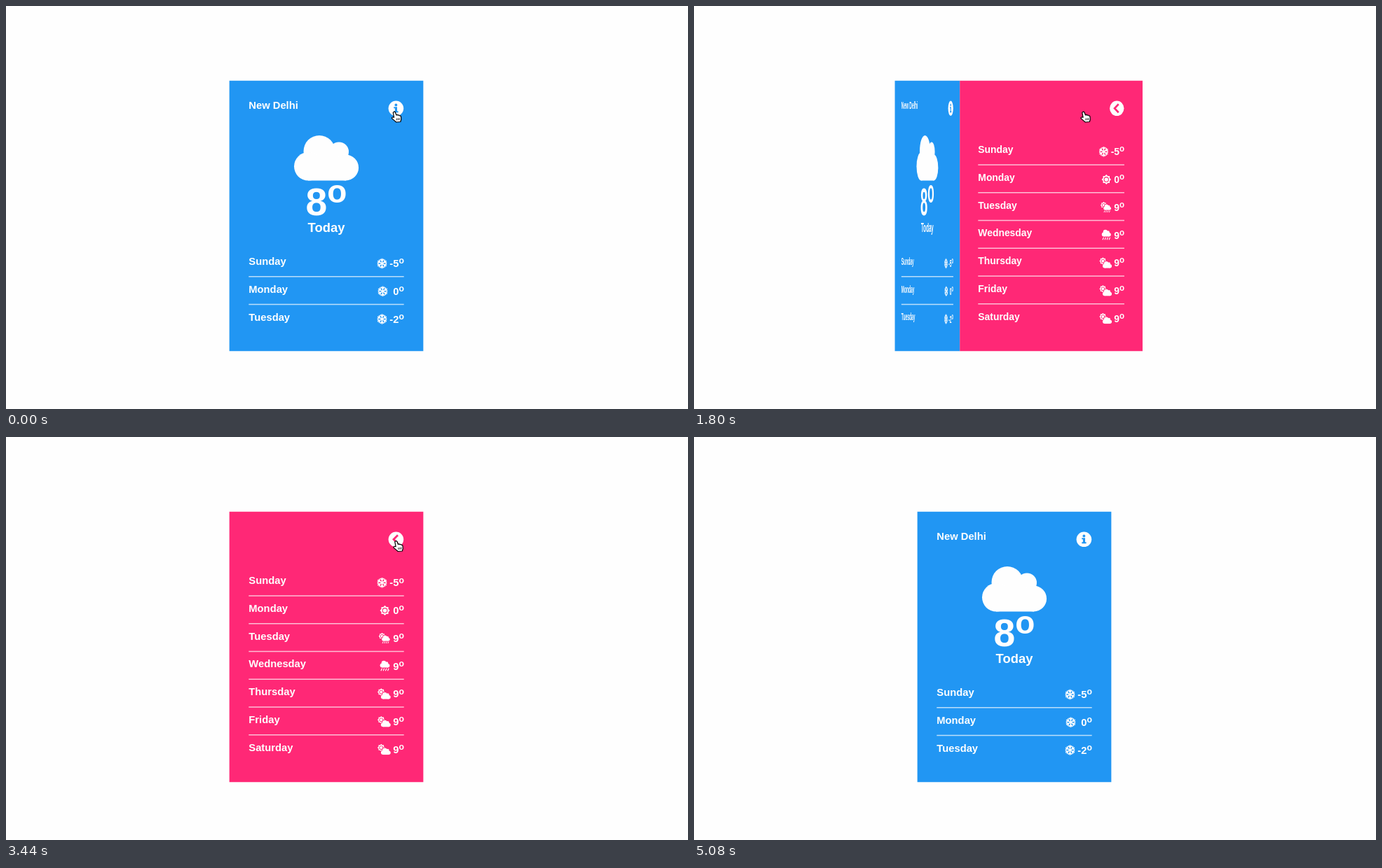
These frames come from a looping animation (973x576 px, 5.24 s). An HTML page:

```html
<!DOCTYPE html>
<html lang="en">
<head>
<meta charset="utf-8">
<title>Weather card</title>
<style>
  html, body { margin: 0; width: 100%; height: 100%; overflow: hidden; background: #fefefe; }
  svg { display: block; width: 100%; height: 100%; }
  text { font: bold 14.75px "Liberation Sans", Arial, sans-serif; }
  .sup { font-size: .833em; }
  .big { font-size: 55.3px; }
  .today { font-size: 18.44px; }
  #front { color: #2196f3; }
  #side { color: #ff2876; }
  .face { fill: #fefefe; }
  .cut { fill: currentColor; }
  .rule { stroke: #fefefe; stroke-opacity: .7; stroke-width: 1.4; }
  .stroke { fill: none; stroke: #fefefe; stroke-width: 1.6; }
</style>
</head>
<body>
<svg viewBox="0 0 973 576">
  <defs>
    <g id="cloud">
      <circle cx="-10" cy="-9.5" r="22.5"/>
      <circle cx="18" cy="-8.5" r="14"/>
      <circle cx="-25.7" cy="12.3" r="20.3"/>
      <circle cx="27.6" cy="14" r="18.5"/>
      <path d="M-26 0H28V32.5H-26Z"/>
    </g>
    <path id="arm" class="stroke" d="M0 0V-7.3M-2.7 -6.2L0 -3.7L2.7 -6.2"/>
    <g id="snow"></g>
    <g id="sun">
      <path d="M-5 -5H5V5H-5ZM0 -7.1L7.1 0L0 7.1L-7.1 0Z"/>
      <circle class="cut" r="3.9"/>
      <circle r="2.8"/>
    </g>
    <path id="drops" class="stroke" style="stroke-width:1.2" d="M-4 0l-1.6 3.4M-.8 0l-1.6 3.4M2.4 0l-1.6 3.4M5.6 0l-1.6 3.4"/>
    <g id="partly">
      <use href="#sun" transform="translate(-4 -2.6) scale(.75)"/>
      <use href="#cloud" class="cut" transform="translate(2.5 2.5) scale(.175)"/>
      <use href="#cloud" transform="translate(2.5 2.5) scale(.15)"/>
    </g>
    <g id="shower">
      <use href="#sun" transform="translate(-3 -3) scale(.68)"/>
      <use href="#cloud" class="cut" transform="translate(2.4 -.2) scale(.15)"/>
      <use href="#cloud" transform="translate(2.4 -.2) scale(.125)"/>
      <use href="#drops" transform="translate(2 4.6) scale(.8)"/>
    </g>
    <g id="rain">
      <use href="#cloud" transform="translate(0 -2.8) scale(.15)"/>
      <use href="#drops" transform="translate(0 3.4)"/>
    </g>
  </defs>

  <g id="front" class="face">
    <path class="cut" d="M-138.35 106.7H138.35V493.2H-138.35Z"/>
    <text x="-110.7" y="147.2">New Delhi</text>
    <circle cx="99.4" cy="146.3" r="10.8"/>
    <path class="cut" d="M96.3 144.2H101V150.2H102.6V152.2H96.3V150.2H97.9V146.2H96.3Z"/>
    <circle class="cut" cx="99.4" cy="141.4" r="1.9"/>
    <use href="#cloud" x="0" y="217"/>
    <text class="big" x="0" y="299" text-anchor="middle">8<tspan class="sup" dy="-18">o</tspan></text>
    <text class="today" x="0" y="322.8" text-anchor="middle">Today</text>
  </g>

  <g id="side" class="face">
    <path class="cut" d="M-138.35 106.7H138.35V493.2H-138.35Z"/>
    <circle cx="99.4" cy="146.3" r="10.8"/>
    <path d="M102 140.3L96 146.3L102 152.3" fill="none" stroke="currentColor" stroke-width="2.8"/>
  </g>

  <g id="cursor">
    <g id="hand" fill="#fff" stroke="#000" stroke-width="1.2" stroke-linejoin="round">
      <path d="M-1.7 1.4Q0 -1 1.6 1.2L3 5Q4.5 3.8 5.3 5.2Q7 4.4 7.6 5.9Q9.3 5.5 9.5 7.4L9.8 11L8.8 14.5L2.8 15Q-.8 12 -3.5 9.6Q-3.6 7.2 -.4 8.2Z"/>
      <path d="M3.4 9.5V12.5M5.4 9.3V12.3M7.3 9.1V12.1" stroke-width=".8"/>
    </g>
    <path id="arrow" d="M0 0V14.5L3.4 11.4L5.6 16.4L8 15.3L5.8 10.5H10.4Z" stroke="#fff"/>
  </g>
</svg>

<script>
const LOOP = 5240, CAPTURE = 149.4, TURN = 540, HALF = 138.35, CENTER = 457, ROW = 39.75;
const $ = id => document.getElementById(id);

$("snow").innerHTML = [0, 60, 120, 180, 240, 300]
  .map(a => `<use href="#arm" transform="rotate(${a})"/>`).join("");

function addRows(face, top, rows) {
  $(face).insertAdjacentHTML("beforeend", rows.map(([day, icon, degrees, iconX], i) => {
    const y = top + i * ROW;
    const rule = i < rows.length - 1 ? `<path class="rule" d="M-110.7 ${y + 16.8}H110.7"/>` : "";
    return `<text x="-110.7" y="${y}">${day}</text>
      <use href="#${icon}" x="${iconX}" y="${y - 2}"/>
      <text x="110.9" y="${y + 3.2}" text-anchor="end">${degrees}<tspan class="sup" dy="-4.9">o</tspan></text>${rule}`;
  }).join(""));
}

addRows("front", 370, [
  ["Sunday", "snow", "-5", 79.5],
  ["Monday", "snow", "0", 80.5],
  ["Tuesday", "snow", "-2", 79.5]
]);
addRows("side", 210.2, [
  ["Sunday", "snow", "-5", 79.5],
  ["Monday", "sun", "0", 83.5],
  ["Tuesday", "shower", "9", 82.5],
  ["Wednesday", "rain", "9", 83.5],
  ["Thursday", "partly", "9", 82.3],
  ["Friday", "partly", "9", 82.3],
  ["Saturday", "partly", "9", 82.3]
]);

// Start of each quarter turn; they alternate between opening and closing.
const turns = [548, 1703.6, 2901.7, 3906.4];
// Pointer path: time, x, y
const path = [
  [0, 554, 151], [1350, 554, 151], [1490, 555.5, 151], [2230, 555.5, 151], [2530, 565.5, 149.5],
  [2700, 565.5, 149.5], [2980, 556.5, 148.5], [4480, 556.5, 148.5], [4930, 929, 562], [5070, 1010, 660]
];

// cubic-bezier(.25, .1, .25, 1)
function ease(x) {
  if (x <= 0) return 0;
  if (x >= 1) return 1;
  let low = 0, high = 1, u;
  for (let i = 0; i < 20; i++) {
    u = (low + high) / 2;
    if (.75 * u - .75 * u * u + u ** 3 < x) low = u; else high = u;
  }
  return .3 * u + 2.4 * u * u - 1.7 * u ** 3;
}

function pointerAt(t) {
  const i = path.findIndex(p => p[0] > t);
  if (i < 0) return path[path.length - 1].slice(1);
  const [t0, x0, y0] = path[i - 1], [t1, x1, y1] = path[i];
  const k = (t - t0) / (t1 - t0);
  return [x0 + (x1 - x0) * k, y0 + (y1 - y0) * k];
}

function place(face, x, scale) {
  $(face).setAttribute("transform", `matrix(${scale} 0 0 1 ${x} 0)`);
  $(face).style.display = scale > .001 ? "" : "none";
}

function draw(t) {
  const open = turns.reduce((sum, start, i) => sum + (i % 2 ? -1 : 1) * ease((t - start) / TURN), 0);
  const angle = open * 90, c = Math.cos(open * Math.PI / 2), s = Math.sin(open * Math.PI / 2);
  // The turning box drifts slightly sideways.
  const middle = CENTER + Math.min((.19 * angle - 6.65) * s, (90 - angle) * .32);
  place("front", middle - HALF * s, c);
  place("side", middle + HALF * c, s);

  const [x, y] = pointerAt(t);
  $("cursor").setAttribute("transform", `translate(${x} ${y})`);
  $("hand").style.display = x < 575 ? "" : "none";
  $("arrow").style.display = x < 575 ? "none" : "";
}

function tick() {
  const t = performance.now() % LOOP;
  draw(Math.floor(t / CAPTURE) * CAPTURE);
  requestAnimationFrame(tick);
}
tick();
</script>
</body>
</html>
```
